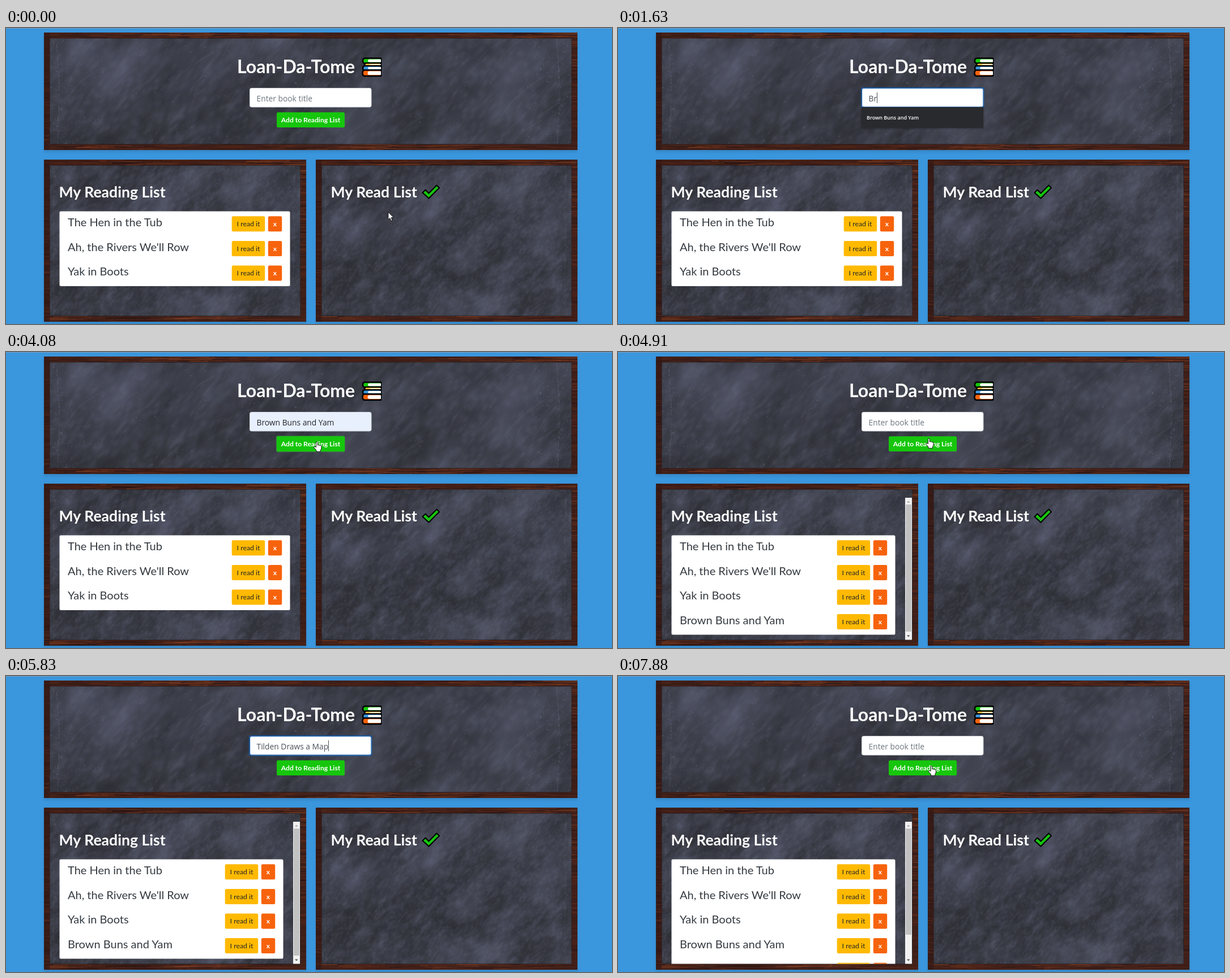
Animation of 1070x524 px, one loop 8 s. Source, as an HTML page with a canvas:

```html
<!DOCTYPE html>
<html lang="en">
<head>
<meta charset="utf-8">
<title>Reading list</title>
<style>
  html, body { margin: 0; width: 100%; height: 100%; overflow: hidden; background: #3a96dd; }
  canvas, svg { position: absolute; left: 0; top: 0; width: 1070px; height: 524px; display: block; }
  text { font-family: Lato, sans-serif; white-space: pre; }
  .ui { font-family: "Open Sans", "Noto Sans", sans-serif; }
</style>
</head>
<body>
<canvas id="wall" width="1070" height="524"></canvas>
<svg id="stage" viewBox="0 0 1070 524"></svg>
<script>
const LOOP = 8000;
const BOOKS = ["The Hen in the Tub", "Ah, the Rivers We'll Row", "Yak in Boots", "Brown Buns and Yam", "Tilden Draws a Map"];
const HISTORY = ["Book", "Slow Dawn", "Numeric Simplicity", "Magnet Chores", "HELLO WORLD", "test"];

/* ---------- boards ---------- */
let seed = 11;
function rnd() {
  seed = seed + 0x6D2B79F5 | 0;
  let t = Math.imul(seed ^ seed >>> 15, 1 | seed);
  t = t + Math.imul(t ^ t >>> 7, 61 | t) ^ t;
  return ((t ^ t >>> 14) >>> 0) / 4294967296;
}
const between = (a, b) => a + (b - a) * rnd();

function makeCanvas(w, h) {
  const c = document.createElement("canvas");
  c.width = w;
  c.height = h;
  return [c, c.getContext("2d")];
}

function chalkboard() {
  const W = 922, H = 614;
  const [c, g] = makeCanvas(W, H);
  g.fillStyle = "#2b2c31";
  g.fillRect(0, 0, W, H);

  // Smoothed noise, stretched along the wiping direction
  for (const [n, alpha] of [[14, .34], [34, .3], [80, .24], [200, .2]]) {
    const [s, p] = makeCanvas(n, n);
    for (let i = 0; i < n * n; i++) {
      p.fillStyle = `rgba(118,124,152,${alpha * rnd() ** 3})`;
      p.fillRect(i % n, i / n | 0, 1, 1);
    }
    g.save();
    g.translate(W / 2, H / 2);
    g.rotate(-.85);
    g.drawImage(s, -1000, -560, 2000, 1120);
    g.restore();
  }

  // Broad wiped patches
  for (const [x, y, r] of [[130, 290, 130], [270, 270, 140], [560, 330, 150], [800, 290, 130], [420, 180, 120], [760, 110, 130]]) {
    g.save();
    g.translate(x, y);
    g.rotate(-.8);
    g.scale(1, .5);
    const soft = g.createRadialGradient(0, 0, 0, 0, 0, r);
    soft.addColorStop(0, "rgba(112,118,146,.2)");
    soft.addColorStop(1, "rgba(112,118,146,0)");
    g.fillStyle = soft;
    g.fillRect(-r, -r, 2 * r, 2 * r);
    g.restore();
  }

  g.lineCap = "round";
  for (let i = 0; i < 480; i++) {
    const x = between(0, W), y = between(0, H), len = between(20, 130), a = between(-1.15, -.6);
    g.strokeStyle = `rgba(150,156,182,${between(.01, .055)})`;
    g.lineWidth = between(.8, 4);
    g.beginPath();
    g.moveTo(x, y);
    g.quadraticCurveTo(x + len * .4 * Math.cos(a - .2), y + len * .5 * Math.sin(a - .2),
      x + len * Math.cos(a), y + len * Math.sin(a));
    g.stroke();
  }
  // Chalk dust, denser towards the sides
  for (let i = 0; i < 6500; i++) {
    const u = rnd(), side = rnd() < .35;
    const x = side ? (rnd() < .5 ? u * u * 90 : W - u * u * 90) : u * W;
    g.fillStyle = `rgba(180,186,206,${.22 * rnd() ** 2})`;
    g.fillRect(x, between(0, H), between(.6, 2), between(.6, 2.4));
  }
  for (const x of [14, 897]) {
    for (let y = 0; y < H; y += 3) {
      g.fillStyle = `rgba(165,172,195,${between(0, .2)})`;
      g.fillRect(x + 2 * Math.sin(y / 40) + between(-1, 1), y, 1.6, 3);
    }
  }
  return c;
}

function drawWall() {
  const g = document.getElementById("wall").getContext("2d");
  const chalk = chalkboard();
  g.fillStyle = "#3a96dd";
  g.fillRect(0, 0, 1070, 524);
  g.fillStyle = "#7aa0bd";
  g.fillRect(0, 0, 1070, 1);

  function board(x, y, w, h, srcY, srcH) {
    g.save();
    g.shadowColor = "rgba(0,0,0,.1)";
    g.shadowBlur = 4;
    g.shadowOffsetY = 4;
    g.fillStyle = "#40201a";
    g.fillRect(x, y, w, h);
    g.restore();

    g.save();
    g.beginPath();
    g.rect(x, y, w, h);
    g.clip();
    for (let i = 0; i < w * h / 40; i++) {
      const u = rnd(), v = rnd();
      const warm = .5 + .5 * Math.sin(u * 10 + v * 3 - 1.5);
      g.fillStyle = rnd() < .5
        ? `rgba(38,18,15,${between(.1, .45)})`
        : `rgba(${88 + 62 * warm},${40 + 32 * warm},${24 + 14 * warm},${between(.1, .6)})`;
      g.fillRect(x + u * w - 30, y + v * h, between(10, 90), between(.6, 1.5));
    }
    g.fillStyle = "rgba(46,22,20,.5)";
    g.fillRect(x, y, 10, h);
    g.restore();

    g.drawImage(chalk, 0, srcY, 922, srcH, x + 10, y + 10, w - 20, h - 20);
    g.strokeStyle = "rgba(20,14,16,.4)";
    g.strokeRect(x + 10.5, y + 10.5, w - 21, h - 21);
  }
  board(67, 8, 942, 208, 213, 188);
  board(67, 233, 463, 287, 30, 555);
  board(547, 233, 462, 287, 30, 555);
}

/* ---------- interface ---------- */
const stage = document.getElementById("stage");

function add(parent, tag, attrs, content) {
  const node = document.createElementNS("http://www.w3.org/2000/svg", tag);
  for (const k in attrs) node.setAttribute(k, attrs[k]);
  if (content) node.textContent = content;
  parent.appendChild(node);
  return node;
}
const group = (parent, attrs) => add(parent, "g", attrs);
const path = (parent, d, attrs) => add(parent, "path", { d, ...attrs });
const box = (parent, x, y, width, height, fill, rx = 0) =>
  add(parent, "rect", { x, y, width, height, fill, rx });
const label = (parent, x, y, size, fill, str, more) =>
  add(parent, "text", { x, y, "font-size": size, fill, ...more }, str);
const show = (node, on) => node.setAttribute("visibility", on ? "visible" : "hidden");

const BOLD = { "font-weight": 700 };
const MID = { "text-anchor": "middle" };

function drawHeadings() {
  label(stage, 408, 80, 32, "#fff", "Loan-Da-Tome", BOLD);
  label(stage, 93.5, 300, 26.6, "#fff", "My Reading List", BOLD);
  label(stage, 573.5, 300, 26.6, "#fff", "My Read List", BOLD);

  const stack = group(stage, { stroke: "#000", "stroke-width": 2.6, "stroke-linejoin": "round" });
  for (const [x, y, h, color] of [[630, 53.5, 9, "#16c60c"], [633, 62, 5.5, "#ffc83d"], [630, 67, 8, "#3a96dd"], [629.5, 74.5, 10.5, "#f7630c"]]) {
    path(stack, `M662 ${y}H${x + 4}Q${x} ${y} ${x} ${y + h / 2}T${x + 4} ${y + h}H662Z`, { fill: color });
    path(stack, `M662 ${y + 2}H${x + 11}q-4 ${h / 2 - 2} 0 ${h - 4}H662Z`, { fill: "#fff", stroke: "none" });
  }
  path(stage, "M735.5 291.5L740.5 286.5L746.5 292.5L760.5 278.5L765 283L746.5 301.5Z",
    { fill: "#16c60c", stroke: "#000", "stroke-width": 2.2, "stroke-linejoin": "round" });
}

function drawList() {
  const clip = add(add(stage, "defs"), "clipPath", { id: "inside" });
  box(clip, 77, 244, 443, 265.5);
  const list = group(stage, { "clip-path": "url(#inside)" });
  const card = box(list, 94.5, 324.5, 407, 132.5, "#fff", 2.5);

  const rows = BOOKS.map((title, i) => {
    const row = group(list, { transform: `translate(0 ${i * 43.6})` });
    label(row, 109, 351, 20, "#343a40", title);
    const keys = group(row);
    box(keys, 398.7, 333.3, 58.5, 27, "#ffb900", 2.5);
    label(keys, 428, 351, 12.3, "#212529", "I read it", MID);
    box(keys, 462.8, 333.3, 24.4, 27, "#f7630c", 2.5);
    label(keys, 475, 351, 12, "#fff", "x", { ...MID, ...BOLD });
    return { row, keys };
  });

  const bar = group(stage);
  box(bar, 507, 258, 12, 251.5, "#f1f1f1");
  const thumb = box(bar, 508, 270, 10, 225, "#c1c1c1");
  path(bar, "M510 266.5L512.75 263.5L515.5 266.5Z", { fill: "#a3a3a3" });
  path(bar, "M510 501.5L512.75 504.5L515.5 501.5Z", { fill: "#505050" });

  return n => {
    const long = n > 3;
    card.setAttribute("width", long ? 395 : 407);
    card.setAttribute("height", 132.5 + (n - 3) * 43.6);
    rows.forEach(({ row, keys }, i) => {
      row.setAttribute("display", i < n ? "inline" : "none");
      keys.setAttribute("transform", `translate(${long ? -12 : 0} 0)`);
    });
    bar.setAttribute("display", long ? "inline" : "none");
    thumb.setAttribute("height", n > 4 ? 188 : 225);
  };
}

function drawForm() {
  const outline = { x: 430.5, y: 106.5, width: 214.5, height: 33.5, rx: 3 };
  const glow = add(stage, "rect", { x: 428.4, y: 104.4, width: 218.8, height: 37.8, rx: 4.5, fill: "#0b58b0", "fill-opacity": .4 });
  const field = add(stage, "rect", { ...outline, stroke: "#ced4da" });
  const edge = add(stage, "rect", { ...outline, fill: "none", stroke: "#1f62ae", "stroke-width": 1.3 });
  const typed = label(stage, 442.5, 129.5, 13.8, "#495057", "", { class: "ui" });
  const caret = box(stage, 443, 114, 1, 19, "#495057");

  const halo = add(stage, "rect", { x: 476.8, y: 148.3, width: 122, height: 29, rx: 3.5, fill: "#3d7a45" });
  box(stage, 478, 149.3, 120, 26.7, "#16c60c", 2.5);
  label(stage, 538, 166.7, 12.1, "#fff", "Add to Reading List", { ...MID, ...BOLD });

  function popup(items, h) {
    const g = group(stage);
    box(g, 428.5, 140, 218.5, h + 2.5, "rgba(0,0,0,.15)", 3);
    box(g, 430.5, 140, 214.5, h, "#292a2d", 1);
    const hot = box(g, 430.5, 146, 214.5, 25.5, "#3f4042");
    items.forEach((s, i) => label(g, 439, 162 + i * 25.8, 9, "#fff", s, { class: "ui", "font-weight": 600 }));
    return { g, hot };
  }
  const all = popup(HISTORY, 166.5);
  const one = popup([BOOKS[3]], 37);

  return s => {
    glow.setAttribute("opacity", s.ring);
    edge.setAttribute("opacity", s.ring);
    field.setAttribute("fill", s.fill ? "#e8f0fe" : "#fff");
    typed.textContent = s.text || "Enter book title";
    typed.setAttribute("fill", s.fill ? "#212529" : s.text ? "#495057" : "#6c757d");
    caret.setAttribute("x", Math.round(442.5 + (s.text ? typed.getComputedTextLength() : 0)));
    show(caret, s.caret);
    halo.setAttribute("opacity", s.press);
    show(all.g, s.pop === "all");
    show(one.g, s.pop === "one" || s.pop === "hover");
    show(all.hot, false);
    show(one.hot, s.pop === "hover");
  };
}

function drawPointer() {
  const pointer = group(stage);
  const shapes = {
    arrow: path(pointer, "M0 0V13.2L3 10.4L5 15.4L7.2 14.5L5.1 9.6H9.2Z", { fill: "#fff", stroke: "#000", "stroke-width": .8 }),
    beam: path(pointer, "M-2.5-5H-.7L0-4.3L.7-5H2.5M0-4.3V4.3M-2.5 5H-.7L0 4.3L.7 5H2.5", { fill: "none", stroke: "#333" }),
    hand: path(pointer, "M-1.5 9.5V1.5a1.4 1.4 0 0 1 2.8 0V6.2a1.3 1.3 0 0 1 2.5.3a1.2 1.2 0 0 1 2.2.5a1.1 1.1 0 0 1 1.9.8V12L6.4 14.5V17.3H-1V15L-5 10.5a1.4 1.4 0 0 1 2-1.8Z",
      { fill: "#fff", stroke: "#000", "stroke-width": .9, "stroke-linejoin": "round" })
  };
  return s => {
    pointer.setAttribute("transform", `translate(${s.x} ${s.y})`);
    for (const k in shapes) show(shapes[k], k === s.cur);
  };
}

/* ---------- timeline: each step changes only what it names ---------- */
const steps = [
  [0, { cur: "arrow", x: 675, y: 326, text: "", caret: 0, ring: 0, fill: 0, pop: "", press: 0, n: 3 }],
  [280, { x: 636, y: 214 }],
  [410, { cur: "beam", x: 603, y: 113 }],
  [550, { x: 607, y: 108 }],
  [700, { x: 587, y: 120 }],
  [1230, { ring: .75, caret: 1, pop: "all" }],
  [1350, { ring: 1 }],
  [1510, { text: "B", pop: "one", cur: "" }],
  [1630, { text: "Br" }],
  [1920, { text: "Bro" }],
  [2050, { text: "Brown" }],
  [2190, { text: "Brown " }],
  [2720, { caret: 0 }],
  [3120, { cur: "beam", x: 588, y: 120 }],
  [3270, { x: 599, y: 137, caret: 1 }],
  [3390, { cur: "arrow", x: 575, y: 155, text: BOOKS[3], fill: 1, pop: "hover", caret: 0 }],
  [3540, { x: 560, y: 161, pop: "", caret: 1 }],
  [3660, { cur: "hand", x: 553, y: 161 }],
  [3820, { x: 549, y: 160, caret: 0 }],
  [3940, { ring: .4, press: .5 }],
  [4080, { x: 549, y: 159, ring: 0, press: 1 }],
  [4630, { n: 4, text: "", fill: 0, press: 0 }],
  [4910, { x: 549, y: 153 }],
  [5030, { cur: "beam", x: 550, y: 138 }],
  [5150, { x: 551, y: 126 }],
  [5300, { ring: .75, pop: "all", caret: 1 }],
  [5430, { ring: 1 }],
  [5680, { caret: 0 }],
  [5830, { cur: "", text: BOOKS[4], pop: "", caret: 1 }],
  [6450, { caret: 0 }],
  [6830, { cur: "beam", y: 130, caret: 1 }],
  [6950, { cur: "hand", x: 553, y: 148 }],
  [7090, { x: 555, y: 159.5 }],
  [7210, { ring: .5, press: .5, caret: 0 }],
  [7330, { ring: 0, press: 1 }],
  [7480, { x: 553, y: 161 }],
  [7600, { x: 553.5, y: 159 }],
  [7880, { n: 5, text: "", press: 0 }]
];
let state = {};
const states = steps.map(([at, change]) => ({ at, s: state = { ...state, ...change } }));

drawWall();
drawHeadings();
const setList = drawList();
const setForm = drawForm();
const setPointer = drawPointer();

const start = performance.now();
let shown = null;
function frame(now) {
  const t = Math.max(0, now - start) % LOOP;
  const { s } = states.filter(e => e.at <= t).pop();
  if (s !== shown) {
    shown = s;
    setList(s.n);
    setForm(s);
    setPointer(s);
  }
  requestAnimationFrame(frame);
}
frame(start);
</script>
</body>
</html>
```
